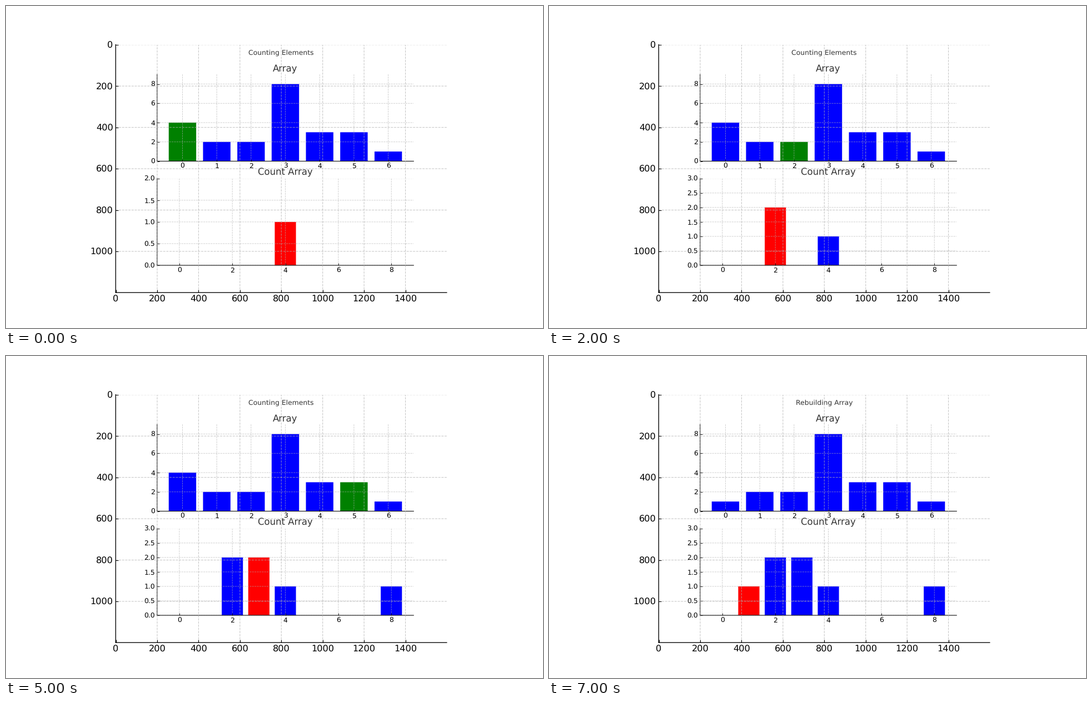
A matplotlib script for the animation above (8000 ms loop, 966 by 580 pixels).

```python
import matplotlib.pyplot as plt
from matplotlib.animation import FuncAnimation
from matplotlib.ticker import MultipleLocator

W, H, DPI = 966, 580, 64
VALUES = [4, 2, 2, 8, 3, 3, 1]
STEPS = len(VALUES) + 1

OUTER_PT = 96.6 / 72            # pixels per point on the large axes
SCALE = 0.77 * H / 1200         # pixels per unit of the embedded picture
INNER_PT = 200 / 72 * SCALE     # pixels per point inside it
PIC_W, PIC_H = 1600 * SCALE, 1200 * SCALE
PIC_X = 0.5125 * W - PIC_W / 2
PIC_Y = 0.11 * H

plt.rcParams.update({
    "font.family": "DejaVu Sans",
    "text.hinting": "none",
    "path.snap": False,
})


def pt(n, unit):
    """Points of a given pixel size, converted to figure points."""
    return n * unit * 72 / DPI


def add_axes(x, y, w, h, unit):
    ax = fig.add_axes([x / W, y / H, w / W, h / H])
    ax.spines[["top", "right"]].set_visible(False)
    for side in ("left", "bottom"):
        ax.spines[side].set_linewidth(pt(1, unit))
    ax.tick_params(direction="in", length=pt(3.5, unit), width=pt(0.8, unit),
                   pad=pt(3.5, unit), labelsize=pt(12, unit))
    ax.grid(True, color="#b0b0b0", alpha=0.7, linestyle="--",
            linewidth=pt(0.8, unit))
    ax.set_axisbelow("line")
    return ax


def add_chart(y, h, count, title):
    ax = add_axes(PIC_X + 0.125 * PIC_W, y, 0.775 * PIC_W, h, INNER_PT)
    bars = ax.bar(range(count), [0] * count, width=0.8, linewidth=0)
    margin = 0.4 + 0.05 * (count - 0.2)
    ax.set_xlim(-margin, count - 1 + margin)
    ax.set_title(title, fontsize=pt(16, INNER_PT), pad=pt(6, INNER_PT),
                 color="#333333")
    return ax, bars


def set_bars(bars, heights, marked, mark_color):
    for i, (bar, height) in enumerate(zip(bars, heights)):
        bar.set_height(height)
        bar.set_facecolor(mark_color if i == marked else "blue")


fig = plt.figure(figsize=(W / DPI, H / DPI), dpi=DPI, facecolor="white")

chart_h = 0.77 * PIC_H / 2.2
low = PIC_Y + 0.11 * PIC_H
top_ax, array_bars = add_chart(low + 1.2 * chart_h, chart_h,
                               len(VALUES), "Array")
top_ax.set_ylim(0, 9)
top_ax.xaxis.set_major_locator(MultipleLocator(1))
top_ax.yaxis.set_major_locator(MultipleLocator(2))

count_ax, count_bars = add_chart(low, chart_h, max(VALUES) + 1, "Count Array")
count_ax.xaxis.set_major_locator(MultipleLocator(2))
count_ax.yaxis.set_major_locator(MultipleLocator(0.5))

caption = fig.text((PIC_X + PIC_W / 2) / W, (PIC_Y + 0.98 * PIC_H) / H, "",
                   ha="center", va="top", fontsize=pt(12, INNER_PT),
                   color="#333333", zorder=0)

# The large axes lie over the embedded picture, so their grid crosses it.
frame_ax = add_axes(PIC_X, PIC_Y, PIC_W, PIC_H, OUTER_PT)
frame_ax.patch.set_visible(False)
frame_ax.set_zorder(1)
frame_ax.set_xlim(-0.5, 1599.5)
frame_ax.set_ylim(1199.5, -0.5)
frame_ax.xaxis.set_major_locator(MultipleLocator(200))
frame_ax.yaxis.set_major_locator(MultipleLocator(200))


def update(step):
    seen = VALUES[:step + 1]
    counts = [seen.count(v) for v in range(max(VALUES) + 1)]
    array = list(VALUES)
    rebuilding = step >= len(VALUES)
    if rebuilding:
        array[0] = min(VALUES)
    caption.set_text("Rebuilding Array" if rebuilding else "Counting Elements")
    set_bars(array_bars, array, step, "green")
    set_bars(count_bars, counts, seen[-1], "red")
    count_ax.set_ylim(0, max(counts) + 1)
    return []


anim = FuncAnimation(fig, update, frames=STEPS, interval=1000,
                     repeat=True, repeat_delay=0, blit=False)
plt.show()
```
